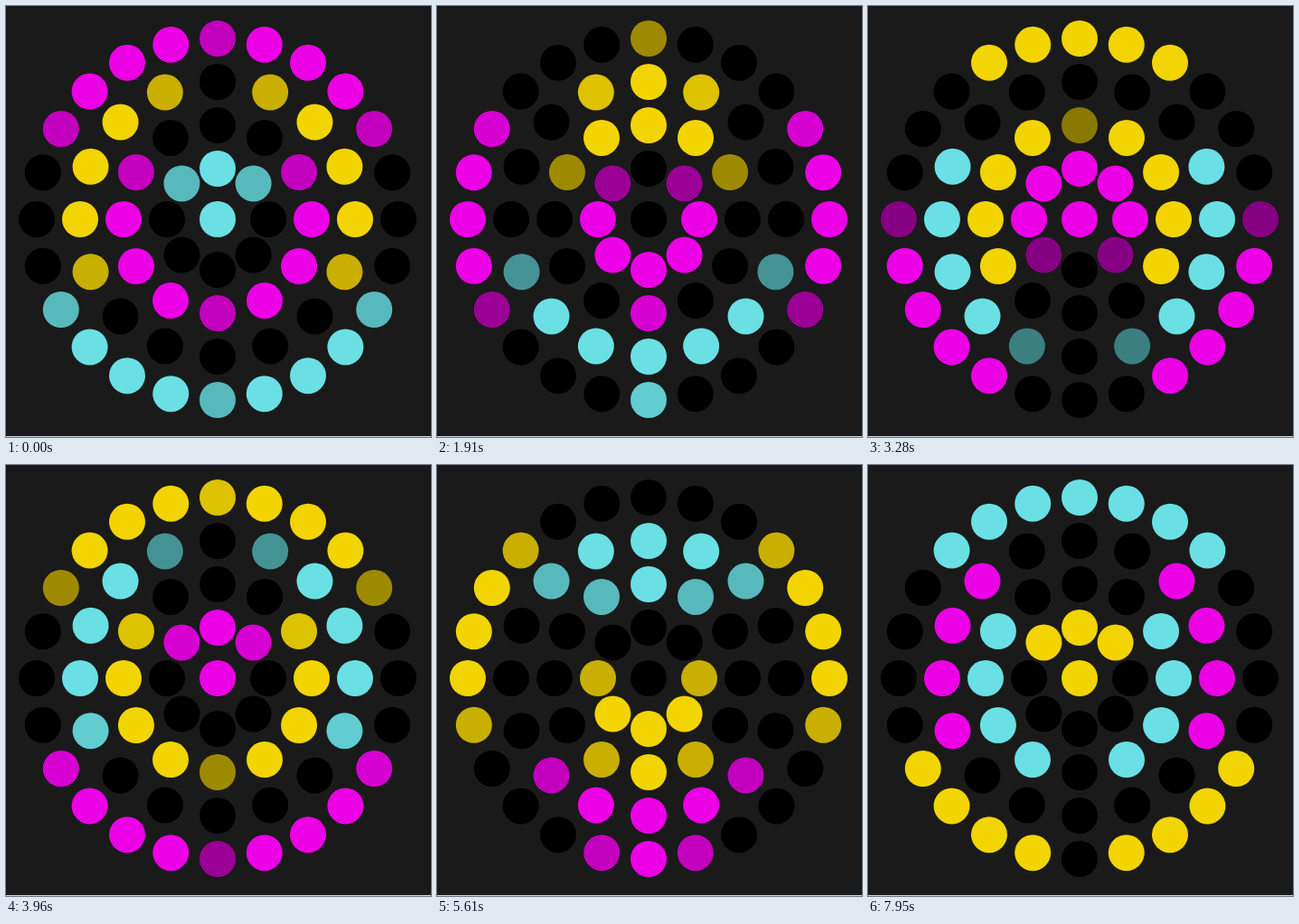
Write an HTML page with a canvas that moves like this. It is 470 px wide and 477 px high and loops after 8000 ms.

```html
<!DOCTYPE html>
<html lang="en">
<head>
<meta charset="utf-8">
<title>Ring lights</title>
<style>
html, body { margin: 0; width: 100%; height: 100%; overflow: hidden; background: #1a1a1a; }
canvas { display: block; }
</style>
</head>
<body>
<canvas id="stage" width="470" height="477"></canvas>
<script>
const ctx = document.getElementById('stage').getContext('2d');
const CX = 234, CY = 236, DOT = 20;
const LOOP = 8000, TICK = 68.4, TICKS_PER_STEP = 7.5;
const MAGENTA = [236, 0, 230], YELLOW = [242, 212, 2], CYAN = [106, 224, 228];
const COLORS = [MAGENTA, YELLOW, CYAN];

// dir: 1 runs down the ring, -1 runs up; lead and hue set the starting phase.
const RINGS = [
  { count: 24, radius: 200, dir: 1, lead: 4.5, hue: 0 },
  { count: 16, radius: 152, dir: -1, lead: -0.5, hue: 1 },
  { count: 12, radius: 104, dir: 1, lead: 6.5, hue: 0 },
  { count: 8, radius: 56, dir: -1, lead: -4.5, hue: 0 },
  { count: 1, radius: 0, dir: 1, lead: -5.5, hue: 0 }
];

const mod = (a, n) => ((a % n) + n) % n;

// Lamp response: steep at the dark end, in visible brightness steps.
function glow(w) {
  if (w >= 1) return 1;
  const h = Math.pow(Math.max(w, 0), 0.265);
  return h < 0.48 ? 0 : 1 - 0.087 * Math.round((1 - h) / 0.087);
}

// Each run of light is four dots long, followed by four dark ones.
function dotColor(phase, hue) {
  const v = mod(phase, 8);
  const level = glow(Math.min(v, 5 - v));
  const rgb = COLORS[mod(Math.floor(phase / 8) + hue, 3)];
  return `rgb(${rgb.map(c => Math.round(c * level)).join(',')})`;
}

function draw(time) {
  const step = Math.floor((time + 20) / TICK) / TICKS_PER_STEP - 0.022;
  ctx.fillStyle = '#1a1a1a';
  ctx.fillRect(0, 0, 470, 477);
  ctx.fillStyle = '#d0d4dc';
  ctx.fillRect(0, 476, 470, 1);
  for (const { count, radius, dir, lead, hue } of RINGS) {
    for (let i = 0; i < count; i++) {
      const a = i / count * Math.PI * 2;
      const fromTop = Math.min(i, count - i);
      ctx.fillStyle = dotColor(step - dir * fromTop + lead, hue);
      ctx.beginPath();
      ctx.arc(CX + radius * Math.sin(a), CY - radius * Math.cos(a), DOT, 0, Math.PI * 2);
      ctx.fill();
    }
  }
}

const start = performance.now();
function frame() {
  draw((performance.now() - start) % LOOP);
  requestAnimationFrame(frame);
}
frame();
</script>
</body>
</html>
```
